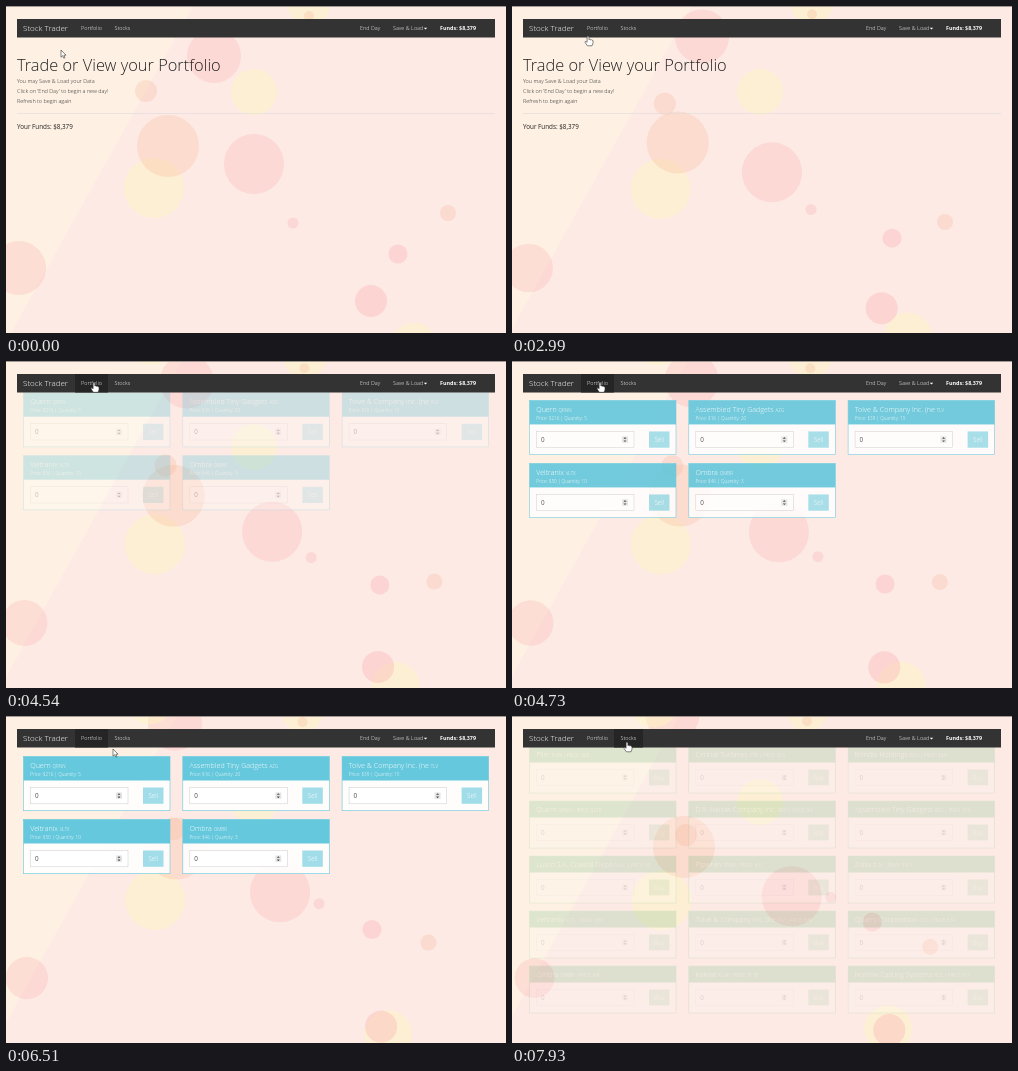
An HTML page for the animation above (8 s loop, 500 px wide and 327 px high).

```html
<!DOCTYPE html>
<html lang="en">
<head>
<meta charset="utf-8">
<title>Stock Trader</title>
<style>
html, body { margin: 0; width: 100%; height: 100%; overflow: hidden; background: #fdeae4; }
svg { display: block; width: 100%; height: 100%; font-family: "Open Sans", sans-serif; font-weight: 300; }
</style>
</head>
<body>
<svg id="stage" viewBox="0 0 500 327"></svg>
<script>
const LOOP = 8000, SLIDE = 350, LIFT = 12.6;
const PINK = ['#f7a3a8', .25], PEACH = ['#f6b090', .25], YELLOW = ['#fdf6b8', .38], ROSE = ['#f7a3ac', .3];

// x, y, radius, speed x, speed y (px per second), paint, growth of the radius
const bubbles = [
  [208, 50, 27, -6, -6.5, PINK],
  [248, 86, 23, 0, 0, YELLOW],
  [140, 85, 11, 4.3, 4.3, PEACH],
  [148, 182, 30, .2, .3, YELLOW],
  [162, 140, 31, 1.25, -1.15, PEACH],
  [248, 158, 30, 4, 2.8, PINK],
  [287, 217, 5.5, 4, -4.5, PINK],
  [442, 207, 8, -3, 3, PEACH],
  [392, 248, 9.5, -4, -5.3, ROSE],
  [408, 341, 24, -4, -3.5, YELLOW],
  [365, 295, 16, 1.55, 2.4, ROSE],
  [13, 262, 27, 1.2, 0, PINK, -.9],
  [303, -1, 21, -1, -.6, YELLOW],
  [303, 10, 5, -1, -.6, PEACH],
  [150, -30, 24, -1, 2.2, YELLOW]
];

// name, ticker, price, quantity
const holdings = [
  ['Quern', 'QRNN', 216, 5],
  ['Assembled Tiny Gadgets', 'AZG', 16, 20],
  ['Tolve &amp; Company Inc. (ne', 'TLV', 39, 15],
  ['Veltranix', 'VLTX', 50, 10],
  ['Ombra', 'OMBR', 46, 3]
];
const market = [
  ['Plim', 'PLIM', 28], ['Central Turbines', 'CTB', 13], ['Brindle Holdings', 'BDH', 24],
  holdings[0], ['D.R. Hallow Company Inc.', 'DRH', 4], holdings[1],
  ['Lusco S.A. Coastal Depo', 'LUSC', 5], ['Pipwren', 'PPWR', 31], ['Zolta', 'ZLTA', 301],
  holdings[3], holdings[2], ['Quarry Corporation', 'QYC', 34],
  holdings[4], ['Kalivar', 'KLVR', 178], ['Norrow Casting Systems', 'NCS', 11]
];

// time, x, y of the pointer's tip
const path = [
  [0, 55, 44], [700, 47, 45], [1300, 45, 44], [2060, 45, 44], [2850, 76, 30], [2990, 76, 30],
  [3660, 88, 21.5], [5430, 88, 21.5], [6230, 104, 33], [6510, 107, 33], [7000, 109, 32],
  [7300, 115, 26], [LOOP, 115, 26]
];

const text = (x, y, size, str, attrs = 'fill="#222"') =>
  `<text x="${x}" y="${y}" font-size="${size}" ${attrs}>${str}</text>`;
const rect = (x, y, w, h, fill, attrs = '') =>
  `<rect x="${x}" y="${y}" width="${w}" height="${h}" fill="${fill}" ${attrs}/>`;
const white = 'fill="#fff"';
const small = str => `<tspan font-size="4.64">${str}</tspan>`;

function orderRow(x, y, h, label, color) {
  const mid = y + h / 2;
  return rect(x + 7, y, 97.5, h, '#fff', 'stroke="#ccc" stroke-width=".5"') +
    text(x + 11.5, mid + 2.4, 6.3, '0', 'fill="#444" font-weight="400"') +
    rect(x + 92.5, mid - 3.2, 6, 6.4, '#e4e4e4') +
    `<path d="M${x + 94} ${mid - .8}l1.5-1.7 1.5 1.7zm0 1.6l1.5 1.7 1.5-1.7z" fill="#444"/>` +
    rect(x + 119.5, y, 20.5, h, color) +
    text(x + 129.8, mid + 2.3, 6.3, label, white + ' text-anchor="middle"');
}

function card(x, y, h, head, color, title, body) {
  return rect(x, y, 146.5, h, '#fff', `fill-opacity=".9" stroke="${color}" stroke-width=".6"`) +
    rect(x, y, 146.5, head, color) + text(x + 6.7, y + 11.2, 7.14, title, white) + body;
}

const column = i => 17.5 + i % 3 * 159.3;

const home =
  text(11, 64.5, 16.4, 'Trade or View your Portfolio') +
  text(11, 77, 5.46, 'You may Save &amp; Load your Data') +
  text(11, 87.2, 5.46, "Click on 'End Day' to begin a new day!") +
  text(11, 97.4, 5.46, 'Refresh to begin again') +
  rect(11, 107, 478, .6, '#ddd') +
  text(11, 123.4, 6.3, 'Your Funds: $8,379', 'fill="#222" font-weight="400"');

const portfolio = holdings.map(([name, code, price, count], i) => {
  const x = column(i), y = 40.5 + (i / 3 | 0) * 63, color = '#65c8dc';
  return card(x, y, 54.2, 24, color, `${name} ${small(code)}`,
    text(x + 6.7, y + 19.3, 4.64, `Price: $${price} | Quantity: ${count}`, white) +
    orderRow(x, y + 31, 16.3, 'Sell', '#a0dde8'));
}).join('');

const stocks = market.map(([name, code, price], i) => {
  const x = column(i), y = 40.5 + (i / 3 | 0) * 55;
  return card(x, y, 47, 16.5, '#43ac6a', `${name} ${small(`${code} | PRICE: $${price}`)}`,
    orderRow(x, y + 23.5, 15.8, 'Buy', '#8fcda6'));
}).join('');

const nav = rect(11, 13, 478, 18.5, '#333') +
  rect(69, 13, 33, 18.5, '#252525', 'id="tab1"') + rect(102, 13, 29, 18.5, '#252525', 'id="tab2"') +
  text(17, 25.4, 8.05, 'Stock Trader', white) +
  [[75, 'Portfolio'], [108.5, 'Stocks'], [354, 'End Day'], [387, 'Save &amp; Load']]
    .map(([x, label]) => text(x, 24.4, 5.46, label, white)).join('') +
  '<path d="M417.8 21.8h3.4l-1.7 1.8z" fill="#fff"/>' +
  text(434, 24.4, 5.4, 'Funds: $8,379', white + ' font-weight="700"');

const outline = 'fill="#fff" stroke="#333" stroke-width=".6" stroke-linejoin="round"';
const $ = id => document.getElementById(id);

$('stage').innerHTML = rect(0, 0, 500, 327, '#fdeae4') +
  '<path id="wedge" d="M0 0H187L5 327H0z" fill="#fef1e3"/>' +
  bubbles.map(b => `<circle class="bubble" fill="${b[5][0]}" fill-opacity="${b[5][1]}"/>`).join('') +
  rect(0, 0, 500, .8, '#8c8583') +
  `<g id="home">${home}</g><g id="portfolio">${portfolio}</g><g id="stocks">${stocks}</g>` + nav +
  `<path id="arrow" d="M0 0V7.2L1.7 5.7 2.8 8.2 4 7.7 2.9 5.2H5z" ${outline}/>` +
  `<path id="hand" d="M-.9.6Q0-.6.9.6V3.6Q2-.1+3 2.6 4 4 3 4.2 4 3.2 5 4.2V7L4 9.8H-.8L-3 6.4Q-3.2 5-1.9 5.3L-.9 6.2z" ${outline}/>`;

// A fixed hand outline with one finger raised
$('hand').setAttribute('d', 'M-.9.7Q0-.6.9.7V3.5Q2 2.8 2.5 3.8 3.5 3.2 3.9 4.2 4.9 4 5 5V7.2L4 9.8H-.6L-2.9 6.5Q-3.1 5-1.9 5.4L-.9 6.3z');

const circles = document.querySelectorAll('.bubble');
const easeOut = (t, start) => {
  const x = Math.min(1, Math.max(0, (t - start) / SLIDE));
  return 1 - (1 - x) ** 2;
};

function place(id, shown) {
  $(id).setAttribute('opacity', shown);
  $(id).setAttribute('transform', `translate(0 ${-LIFT * (1 - shown)})`);
}

function pointer(t) {
  const i = Math.max(1, path.findIndex(p => p[0] > t));
  const [t0, x0, y0] = path[i - 1], [t1, x1, y1] = path[i];
  const u = (t - t0) / (t1 - t0), k = u * u * (3 - 2 * u);
  return [x0 + (x1 - x0) * k, y0 + (y1 - y0) * k];
}

function draw(now) {
  const t = now % LOOP, s = t / 1000;
  bubbles.forEach(([x, y, r, vx, vy, , grow = 0], i) => {
    circles[i].setAttribute('cx', x + vx * s);
    circles[i].setAttribute('cy', y + vy * s);
    circles[i].setAttribute('r', r + grow * s);
  });
  $('wedge').setAttribute('transform', `translate(${-2.5 * s} 0)`);

  place('home', 1 - easeOut(t, 4020));
  place('portfolio', easeOut(t, 4483) - easeOut(t, 7455));
  place('stocks', easeOut(t, 7900));
  $('tab1').setAttribute('opacity', +(t >= 4020 && t < 7455));
  $('tab2').setAttribute('opacity', +(t >= 7455));

  const [x, y] = pointer(t), linked = y < 31.5;
  for (const id of ['arrow', 'hand']) {
    $(id).setAttribute('transform', `translate(${x} ${y})`);
    $(id).setAttribute('opacity', +((id === 'hand') === linked));
  }
  requestAnimationFrame(draw);
}
requestAnimationFrame(draw);
</script>
</body>
</html>
```
